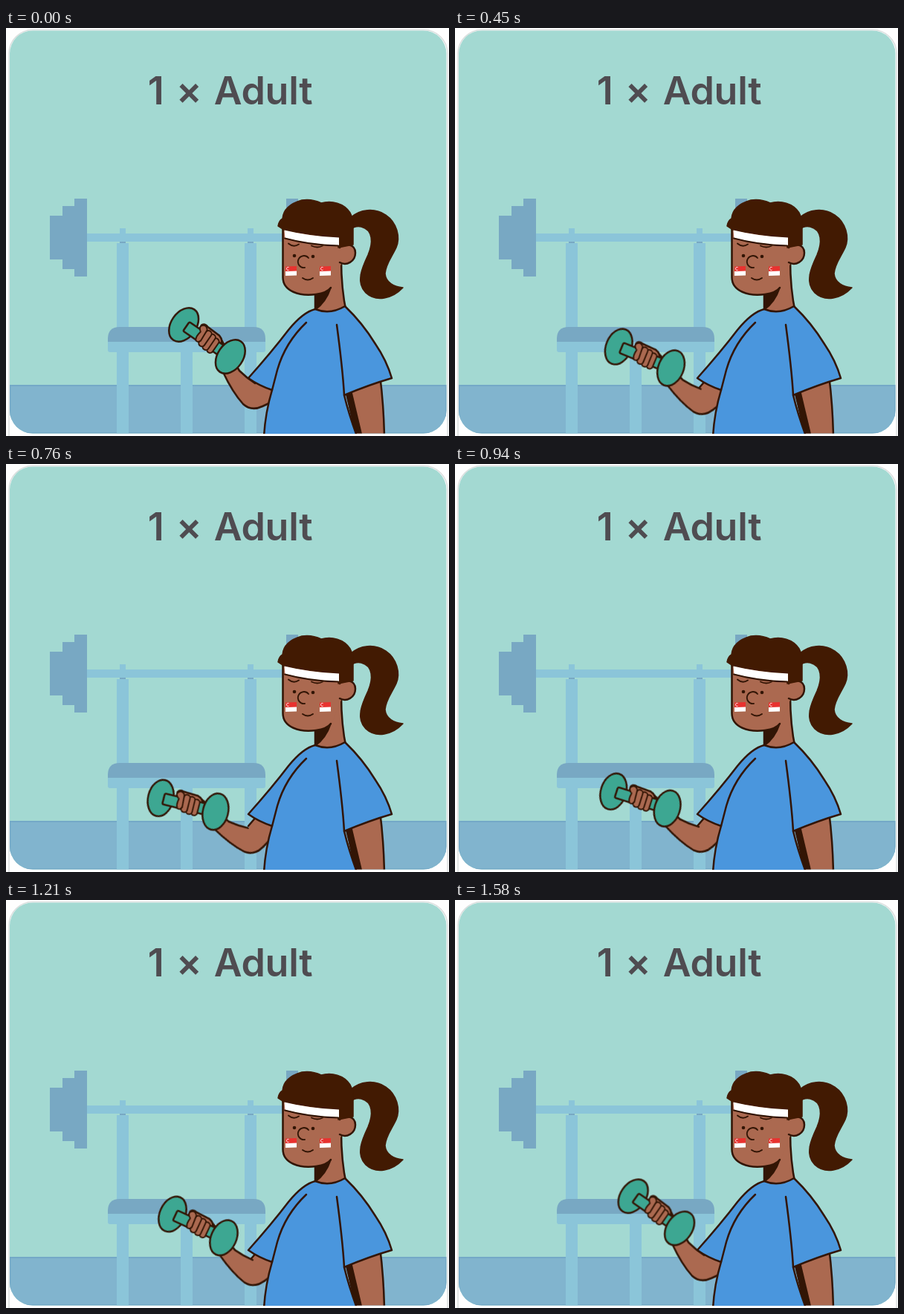
Animation of 596 by 550 pixels, one loop 1.61 s. Source, as an HTML page:

```html
<!DOCTYPE html>
<html lang="en">
<head>
<meta charset="utf-8">
<title>1 × Adult</title>
<style>
  html, body { margin: 0; width: 100%; height: 100%; overflow: hidden; background: #fefefe; }
  svg { display: block; width: 596px; height: 550px; }
  .title {
    font: 600 52px Inter, Roboto, sans-serif;
    font-feature-settings: "calt" 0;
    letter-spacing: -.3px;
    word-spacing: 3.5px;
    fill: #4f4c51;
    text-anchor: middle;
  }
  .light { fill: #8bc5d9; }
  .dark { fill: #78a8c3; }
  .ink { stroke: #321505; stroke-width: 2.5; stroke-linecap: round; stroke-linejoin: round; }
  .thin { stroke-width: 1.9; }
  .skin { fill: #ab6950; }
  .green { fill: #3da792; }
  .shirt { fill: #4a96dd; }
  .hair { fill: #421a02; stroke: #421a02; stroke-width: 1.5; stroke-linejoin: round; }
  .shade { fill: #321505; }
  .line { fill: none; }
  .arm { transform-origin: 270.5px 421.5px; animation: curl 1610ms linear -20ms infinite; }
  @keyframes curl {
    0%, 100% { transform: translate(.7px, -1px) rotate(.5deg); }
    50% { transform: translate(-26.3px, 39.2px) rotate(-21.2deg); }
  }
</style>
</head>
<body>
<svg viewBox="0 0 596 550">
  <defs>
    <clipPath id="card"><rect x="5" y="3.5" width="587.5" height="543" rx="31"/></clipPath>
    <g id="post">
      <rect class="light" x="4" y="270" width="8" height="18"/>
      <rect class="dark" x="4" y="287" width="8" height="4"/>
      <rect class="light" y="290" width="16" height="257"/>
    </g>
    <g id="flag">
      <path fill="#fff" d="M0 6.5 15 6V12.5L0 13Z"/>
      <path fill="#e8322f" d="M0 .5 15 0V6.5L0 7Z"/>
      <path d="M4.5 1.7A2 2 0 1 0 4.5 5.2" fill="none" stroke="#fff"/>
    </g>
  </defs>

  <rect x="4" y="2.5" width="590" height="600" rx="32" fill="#fff" stroke="#dcdfdf" stroke-width="1.5"/>

  <g clip-path="url(#card)">
    <rect width="596" height="550" fill="#a3d9d2"/>
    <rect x="5.5" y="482" width="586.5" height="64" fill="#81b4ce" stroke="#74a9c7" stroke-width="2"/>
    <text class="title" x="301.5" y="103">1 × Adult</text>

    <!-- gym bench -->
    <use href="#post" x="149"/>
    <use href="#post" x="321"/>
    <rect class="light" x="235" y="430" width="16" height="117"/>
    <rect class="light" x="108" y="277" width="272" height="11"/>
    <path class="dark" d="M59 253H76V240H92V230H109V335H92V325H76V312H59ZM377 230H393V335H377Z"/>
    <path class="dark" d="M137 424V419Q137 403 153 403H333Q349 403 349 419V424Z"/>
    <path class="light" d="M137 423H349V434Q349 437 346 437H140Q137 437 137 434Z"/>

    <!-- resting arm and neck -->
    <path class="skin ink" d="M456 480 471 550H509Q508 506 503 468Z"/>
    <path class="shade" d="M456 490 465 488 479 547H470Z"/>
    <path class="skin ink" d="M416 350V384H458Q451 352 451 312Z"/>
    <path class="shade" d="M416 358Q433 358 438 350Q431 371 416 381Z"/>

    <!-- upper arm -->
    <path class="skin" d="M340 470 326 488 340 512 368 503V470Z"/>
    <path class="ink line" d="M338 474 326 488"/>

    <g class="arm">
      <path class="skin" d="M335 479 314 462 286 414 262 404 268 418 298 440 292 464C300 481 309 496 319 507Q330 517 345 510L362 502 372 488Z"/>
      <path class="ink line" d="M335 479Q324 472 314 462L286 414M298 440 292 464C300 481 309 496 319 507Q330 517 345 510L362 502"/>
      <g class="ink" transform="translate(270.5 421.5) rotate(34.5)">
        <path class="skin" d="M-16 2-18-13Q-16-18-10-16L10-15Q18-13 21-2L14 6Z"/>
        <ellipse class="green" cx="-38" rx="17" ry="25"/>
        <rect class="green" x="-34" y="-7.500" width="66" height="15" rx="2"/>
        <ellipse class="green" cx="38" rx="17" ry="25"/>
        <g class="skin thin">
          <rect x="6" y="-10" width="8.500" height="22" rx="4.200"/>
          <rect x="-1" y="-12" width="8.500" height="24" rx="4.200"/>
          <rect x="-8" y="-13" width="8.500" height="24" rx="4.200"/>
          <path d="M-16-14Q-12-17-8-12L-7 5Q-9 10-13 8Q-16 4-14-5Q-21-10-16-14Z"/>
        </g>
      </g>
    </g>

    <!-- shirt -->
    <path class="shirt ink" d="M416 379C404 382 393 391 380 407Q358 436 326 472Q340 482 358 488Q349 518 347 550H472Q461 520 455 495Q488 481 519 472Q512 448 497 426Q480 398 456 375Q436 387 416 379Z"/>
    <path class="ink line" d="M404 397C384 416 371 440 365 461L358 488M445 400C449 430 453 460 455 495"/>

    <!-- ponytail and head -->
    <path class="hair" d="M463 256C476 244 496 242 511 252C526 262 531 282 525 296C519 309 511 318 510 331C511 343 522 349 534 350C520 365 498 370 484 357C470 343 479 323 487 306C494 290 494 272 478 268Q470 266 463 272Z"/>
    <path class="skin" d="M372 265V336C372 355 395 362 417 359Q433 357 438 350L451 318V275Z"/>
    <path class="ink line" d="M372.500 270V336C372.500 355 395 362 417 359Q432 357 437 350"/>
    <path class="skin ink" d="M449 296C455 289 470 291 470 303C470 315 458 321 449 316"/>
    <path class="hair" d="M366 267Q367 260 372 257C373 244 384 236 398 232Q412 230 424 236C438 232 455 236 463 249Q468 258 467 270V292L447 296V284L375 273Z"/>
    <path fill="#fff" d="M374.500 272.500Q409 281 448 282.500V293Q408 292 375.500 283Z"/>
    <path class="ink line thin" d="M375 283.500Q408 292.500 447 293.500M380 290.500Q387 296.500 394 291.500M411 293.500Q419 297.500 426 293.500"/>
    <circle class="shade" cx="388" cy="307" r="2.300"/>
    <circle class="shade" cx="413" cy="308" r="2.300"/>
    <path class="ink line thin" d="M407 310A8 8 0 1 0 402 323M399 337Q406 342 413 337"/>
    <use href="#flag" x="376" y="321"/>
    <use href="#flag" x="422" y="321"/>
  </g>
</svg>
</body>
</html>
```
